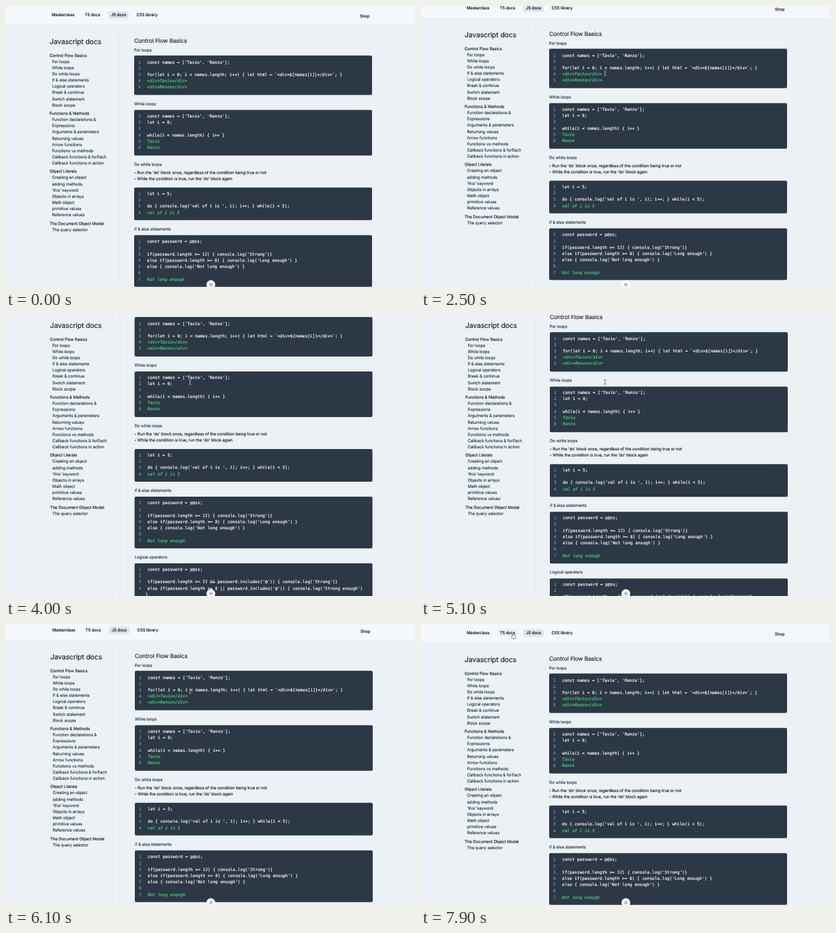
Animation, 600 px wide and 413 px high, one loop 8 s. Source, as an HTML page with a canvas:

```html
<!DOCTYPE html>
<html lang="en">
<head>
<meta charset="utf-8">
<title>Javascript docs</title>
<style>
html, body { margin: 0; width: 100%; height: 100%; overflow: hidden; background: #ebf1f5; }
#stage { position: relative; width: 600px; height: 413px; overflow: hidden; background: #ebf1f5;
  text-rendering: geometricPrecision; font-family: Inter, "Open Sans", sans-serif; color: #1a202c; }
#stage * { position: absolute; }
#page, #side { left: 0; top: 0; }
#head { left: -10px; top: -20.8px; width: 620px; height: 48px; background: #f5f8fa; border-bottom: 1px solid #e3e9f0; }
#rule { left: 166px; top: 38px; width: 1px; height: 500px; background: #e2e9ee; }
.t { white-space: pre; line-height: 10px; font-size: 6px; letter-spacing: -.013em; -webkit-text-stroke: .13px; }
.h1 { font-size: 10.4px; }
.h2 { font-size: 8.53px; }
.item { color: #2d3748; }
.nav { font-weight: 500; letter-spacing: -.02em; }
.pill { top: 6.6px; height: 11px; border-radius: 2px; background: #dee5ec; }
.code { left: 188px; width: 349px; border-radius: 2px; background: #2c3845; }
.mono { font: 6.1px/10px "DejaVu Sans Mono", monospace; letter-spacing: 0; color: #fff; -webkit-text-stroke: .16px; }
.num { color: #a0aec0; -webkit-text-stroke: 0; }
.out { color: #42d777; font-style: italic; }
#top { left: 293.5px; top: 403.4px; width: 13px; height: 13px; border-radius: 50%; background: #fafcfd; }
#top i { left: 4px; top: 4px; width: 5px; height: 5px; border-radius: 50%; background: #b4bdc8; }
#cursor { left: 0; top: 0; }
</style>
</head>
<body>
<div id="stage">
  <div id="page"><div id="head"></div></div>
  <div id="side"><div id="rule"></div></div>
  <div id="top"><i></i></div>
  <canvas id="cursor"></canvas>
</div>
<script>
const $ = id => document.getElementById(id);
const page = $('page'), side = $('side'), canvas = $('cursor');

function add(parent, cls, style, text = '') {
  const el = document.createElement('div');
  el.className = cls;
  Object.assign(el.style, style);
  el.textContent = text;
  parent.append(el);
  return el;
}
// y is the middle of the line
const put = (parent, x, y, cls, text) =>
  add(parent, 't ' + cls, { left: x + 'px', top: y - 5 + 'px' }, text);

// navigation
const hover = add(page, 'pill', { left: '112px', width: '30px', background: '#ebf0f4' });
add(page, 'pill', { left: '150px', width: '30px' });
put(page, 67, 13, 'nav', 'Masterclass');
put(page, 115.5, 13, 'nav', 'TS docs');
put(page, 154, 13, 'nav', 'JS docs');
put(page, 191.5, 13, 'nav', 'CSS library');
put(page, 519, 14.5, 'nav', 'Shop');

// sidebar
const menu = {
  'Control Flow Basics': ['For loops', 'While loops', 'Do while loops', 'If & else statements',
    'Logical operators', 'Break & continue', 'Switch statement', 'Block scope'],
  'Functions & Methods': ['Function declarations &', 'Expressions', 'Arguments & parameters',
    'Returning values', 'Arrow functions', 'Functions vs methods',
    'Callback functions & forEach', 'Callback functions in action'],
  'Object Literals': ['Creating an object', 'adding methods', "'this' keyword", 'Objects in arrays',
    'Math object', 'primitive values', 'Reference values'],
  'The Document Object Model': ['The query selector']
};
put(side, 64, 52, 'h1', 'Javascript docs');
let row = 72.5;
for (const [head, items] of Object.entries(menu)) {
  put(side, 64, row, '', head);
  for (const item of items) put(side, 67.5, row += 9.15, 'item', item);
  row += 12.2;
}

// code blocks; lines starting with > are output, with ~ are wrapped
function block(y, label, top, lines) {
  put(page, 188, y, 'item', label);
  add(page, 'code', { top: top + 'px', height: lines.length * 9.2 + 12 + 'px' });
  let n = 0;
  lines.forEach((line, i) => {
    const ly = top + 10.4 + i * 9.2, wrap = line[0] === '~', out = line[0] === '>';
    if (!wrap) put(page, 194, ly, 'mono num', ++n);
    put(page, wrap ? 204 : 207, ly, out ? 'mono out' : 'mono', wrap || out ? line.slice(1) : line);
  });
}
const names = "const names = ['Tavio', 'Renzo'];";
put(page, 188, 51, 'h2', 'Control Flow Basics');
block(65, 'For loops', 72.2, [names, '',
  'for(let i = 0; i < names.length; i++) { let html = `<div>${names[i]}</div>`; }',
  '><div>Tavio</div>', '><div>Renzo</div>']);
block(144, 'While loops', 151.6, [names, 'let i = 0;', '',
  'while(i < names.length) { i++ }', '>Tavio', '>Renzo']);
block(232.5, 'Do while loops', 265.6, ['let i = 5;', '',
  "do { console.log('val of i is ', i); i++; } while(i < 5);", '>val of i is 5']);
put(page, 188, 244.6, '', "- Run the 'do' block once, regardless of the condition being true or not");
put(page, 188, 253.8, '', "- While the condition is true, run the 'do' block again");
block(328.3, 'if & else statements', 336, ['const password = p@ss;', '',
  "if(password.length >= 12) { console.log('Strong')}",
  "else if(password.length >= 8) { console.log('Long enough') }",
  "else { console.log('Not long enough') }", '', '>Not long enough']);
block(426, 'Logical operators', 433.6, ['const password = p@ss;', '',
  "if(password.length >= 12 && password.includes('@')) { console.log('Strong')}",
  "else if(password.length >= 8 || password.includes('@')) { console.log('Strong enough')",
  '~}', "else { console.log('Not long enough') }", '', '>Not long enough']);

// motion: [time, value...]
const scroll = [[0, 0], [2200, 0], [2500, 10], [3300, 47.6], [3700, 65], [4000, 69.8], [4400, 69.8],
  [5100, 47.6], [6100, 4], [6300, 3.5], [6700, 0], [8000, 0]];
const shift = [[0, 0], [3300, 0], [4500, 1], [6300, 1], [7100, 0], [8000, 0]];
const path = [[0, 106, 8], [100, 106, 8], [900, 129, 22], [1500, 298, 150], [1800, 302, 190],
  [2200, 270, 98.5], [6400, 270, 98.5], [7000, 133, 13], [7500, 130, 14], [7900, 135, 14], [8000, 135, 14]];
const drop = .8, sticky = 37;

function at(keys, t, k = 1) {
  let i = 1;
  while (i < keys.length - 1 && keys[i][0] < t) i++;
  const a = keys[i - 1], b = keys[i];
  return a[k] + (b[k] - a[k]) * (t - a[0]) / (b[0] - a[0]);
}

const ratio = window.devicePixelRatio || 1;
canvas.width = 600 * ratio;
canvas.height = 413 * ratio;
canvas.style.cssText = 'width:600px;height:413px';
const ctx = canvas.getContext('2d');

const arrow = new Path2D('M0 0V7.4L1.7 5.8 2.8 8.3 4 7.8 2.9 5.4H5.2Z');
const hand = new Path2D('M-.6.4Q0-.5.7.4V2.6L3 3.1Q3.8 3.4 3.7 4.3L3 7.6H-.7L-2.4 4.7Q-2.3 3.8-1.5 4.2L-.6 5Z');
const beam = new Path2D('M-1.5-3.3Q0-3.3 0-2.4Q0-3.3 1.5-3.3M0-2.5V2.5M-1.5 3.3Q0 3.3 0 2.4Q0 3.3 1.5 3.3');

function outline(shape, width, color) {
  ctx.lineWidth = width;
  ctx.strokeStyle = color;
  ctx.stroke(shape);
}

function drawCursor(x, y, kind) {
  ctx.setTransform(ratio, 0, 0, ratio, 0, 0);
  ctx.clearRect(0, 0, 600, 413);
  if (!kind) return;
  ctx.translate(x, y);
  ctx.lineJoin = 'round';
  if (kind === 'beam') {
    outline(beam, 1.6, 'rgba(255,255,255,.7)');
    outline(beam, .7, '#333');
    return;
  }
  const isHand = kind === 'hand', shape = isHand ? hand : arrow;
  outline(shape, 1, isHand ? '#111' : '#fff');
  ctx.fillStyle = isHand ? '#fff' : '#111';
  ctx.fill(shape);
}

function draw(now) {
  const t = Math.floor(now % 8000 / 100) * 100;
  const s = at(scroll, t), dx = at(shift, t);
  page.style.transform = `translate(${dx}px, ${drop - s}px)`;
  side.style.transform = `translate(${dx}px, ${drop - Math.min(s, sticky)}px)`;
  const x = at(path, t), y = at(path, t, 2);
  const over = x > 112 && x < 142 && y > 7 && y < 18;
  hover.style.visibility = over ? 'visible' : 'hidden';
  drawCursor(x, y, t < 100 ? '' : over ? 'hand' : x > 188 && y > 60 ? 'beam' : 'arrow');
}

const start = performance.now();
function frame() {
  draw(performance.now() - start);
  requestAnimationFrame(frame);
}
frame();
</script>
</body>
</html>
```
